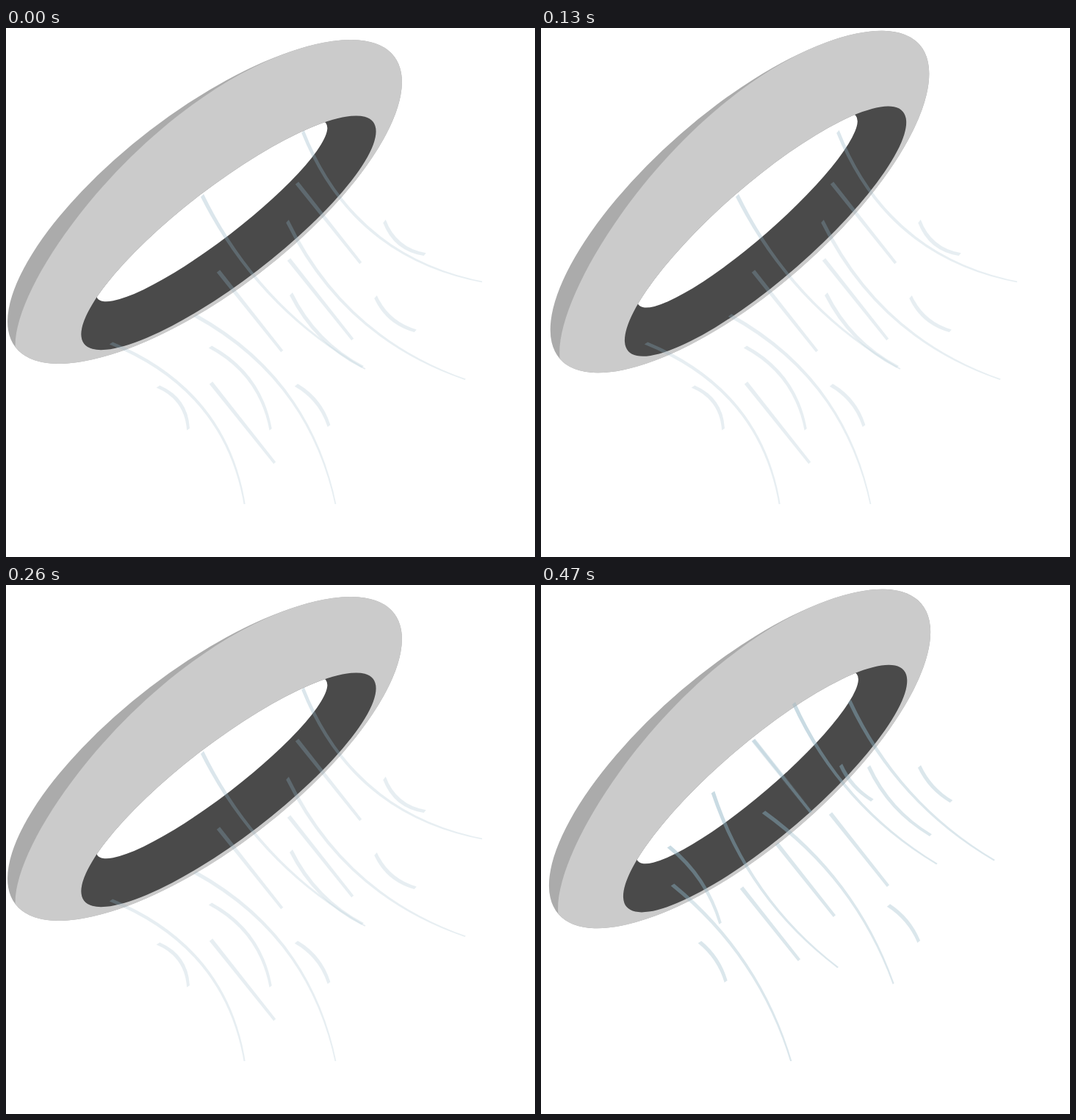
These frames come from a looping animation (720x720 px, 540 ms). An HTML page:

```html
<!DOCTYPE html>
<html lang="en">
<head>
<meta charset="utf-8">
<title>Ring and breeze</title>
<style>
  html, body { margin: 0; width: 100%; height: 100%; overflow: hidden; background: #fff; }
  svg { display: block; width: 100vw; height: 100vh; }
</style>
</head>
<body>
<svg viewBox="0 0 720 720">
  <defs>
    <ellipse id="inside" cy="53.3" rx="248" ry="64.5"/>
    <ellipse id="hole" cy="15.5" rx="196" ry="40.5"/>
    <clipPath id="opening"><use href="#inside"/></clipPath>
    <!-- air shows stronger on the dark inner wall -->
    <mask id="air" maskUnits="userSpaceOnUse" width="720" height="720" style="mask-type: alpha">
      <rect width="720" height="720" opacity=".5"/>
      <g class="tilt" opacity=".5">
        <path fill-rule="evenodd" clip-path="url(#opening)"
          d="M-248 53.3a248 64.5 0 1 1 496 0a248 64.5 0 1 1 -496 0ZM-196 15.5a196 40.5 0 1 1 392 0a196 40.5 0 1 1 -392 0Z"/>
        <use href="#inside" clip-path="url(#opening)"/>
      </g>
    </mask>
  </defs>
  <g class="tilt">
    <ellipse rx="325" ry="122.5" fill="#ababab"/>
    <path d="M-325 0C-270 -77 20 -157 219 -90.5A325 122.5 0 1 1 -325 0Z" fill="#cbcbcb"/>
    <use href="#inside" fill="#4a4a4a"/>
    <use href="#hole" fill="#fff" clip-path="url(#opening)"/>
  </g>
  <g id="wind" fill="#8cb0c2" mask="url(#air)"></g>
</svg>
<script>
const LOOP = 540;
const CENTER = { x: 270.5, y: 236.5 };

// Streak kinds: relative length, and turn (-1 flattens out, 1 drops down).
const kinds = [[1, -1], [1, 1], [.43, 0], [.43, -1], [.43, 1], [.22, -1], [.22, 1]];

// Starting points are listed per kind, in the same order.
const gusts = [
  {
    reach: 324, aim: 47, fan: 8, curve: .3, spread: .14, opacity: .42,
    starts: [
      [[404, 141], [383, 263], [267, 228]],
      [[257, 391], [143, 429]],
      [[396, 211], [289, 331], [385, 315], [279, 483]],
      [[388, 362]],
      [[278, 434]],
      [[515, 263], [503, 366]],
      [[207, 488], [395, 486]]
    ]
  },
  {
    reach: 293, aim: 52, fan: 4.5, curve: .31, spread: 0, opacity: .62,
    starts: [
      [[420, 158], [344, 161], [234, 282]],
      [[303, 309], [179, 408]],
      [[289, 211], [394, 311], [321, 352], [273, 412]],
      [[446, 247]],
      [[174, 356]],
      [[408, 245], [515, 247]],
      [[216, 486], [473, 436]]
    ]
  }
];

// Streaks fan out with their place along the ring's long axis.
function streak(gust, [size, turn], [x, y]) {
  const across = ((x - CENTER.x) * .79 - (y - CENTER.y) * .61) / 90;
  const heading = turn ? gust.aim - gust.fan * Math.tanh(across) : 51.5;
  const len = gust.reach * size;
  const mid = len / 2;
  const bow = -turn * (gust.curve + gust.spread * Math.abs(across)) * mid;
  const head = 2.75, tail = head - len / 180, waist = (head + tail) / 2;
  return `<path transform="translate(${x} ${y}) rotate(${heading})" d="
    M0 ${-head}Q${mid} ${bow - waist} ${len} ${-tail}
    V${tail}Q${mid} ${bow + waist} 0 ${head}Z"/>`;
}

const wind = document.getElementById("wind");
wind.innerHTML = gusts.map(gust => {
  const paths = kinds.flatMap((kind, i) => gust.starts[i].map(p => streak(gust, kind, p)));
  return `<g fill-opacity="${gust.opacity}">${paths.join("")}</g>`;
}).join("");

// Start time and ring tilt in degrees.
const tilts = [[0, 37.5], [100, 41.1], [230, 37.5], [330, 40.5]];
const swaps = [70, 130, 200, 260, 330, 400, 470];
const tilted = document.querySelectorAll(".tilt");

function draw(t) {
  const tilt = tilts.filter(([start]) => t >= start).pop()[1];
  for (const g of tilted) {
    g.setAttribute("transform", `translate(${CENTER.x} ${CENTER.y}) rotate(${-tilt})`);
  }
  const active = swaps.filter(s => t >= s).length % 2;
  [...wind.children].forEach((g, i) => {
    g.setAttribute("visibility", i === active ? "visible" : "hidden");
  });
}

let begin = null;
function tick(now) {
  if (begin === null) begin = now;
  draw((now - begin) % LOOP);
  requestAnimationFrame(tick);
}
draw(0);
requestAnimationFrame(tick);
</script>
</body>
</html>
```
